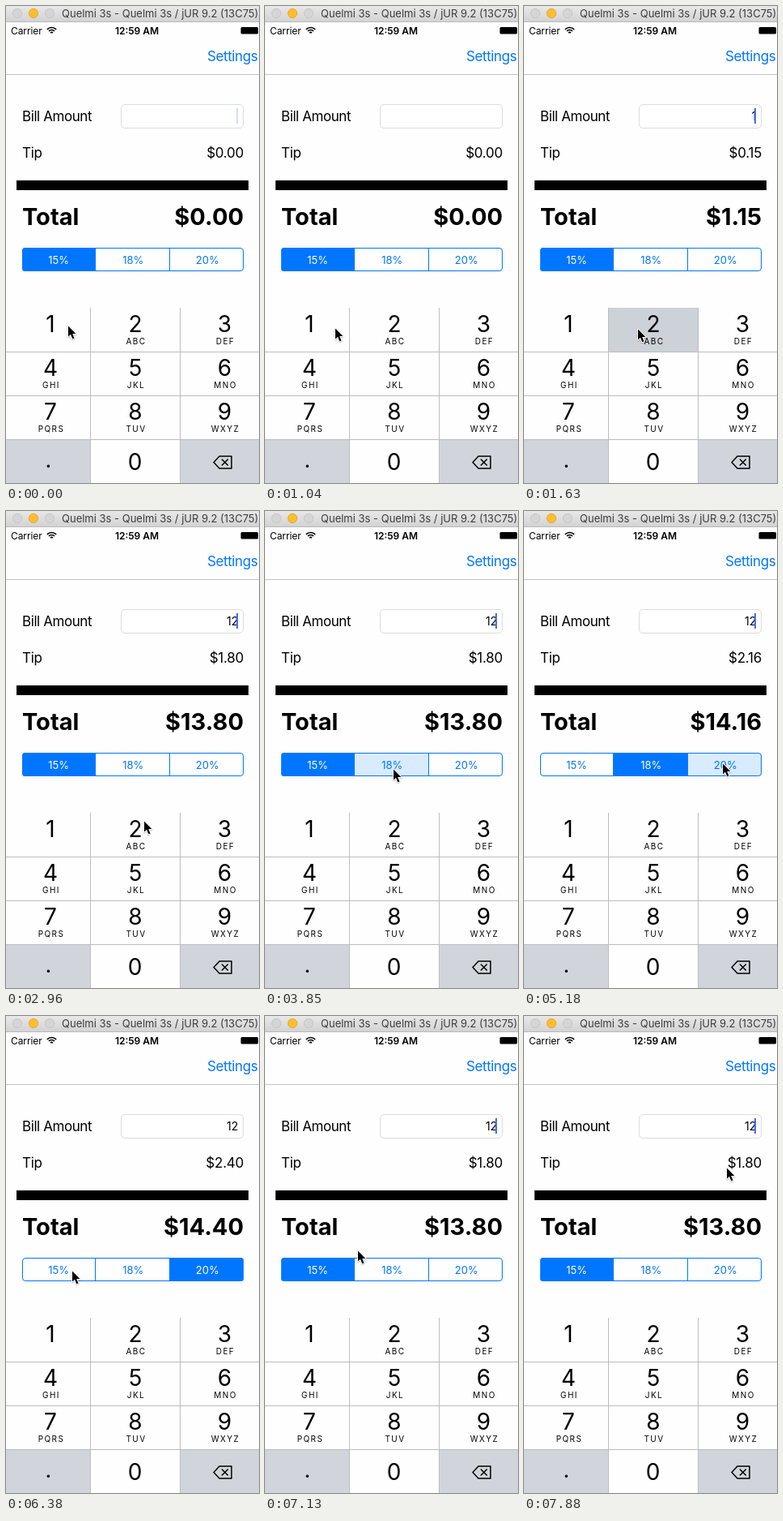
An HTML page with a canvas that plays this animation: 313x588 px, repeating every 8 s.

```html
<!DOCTYPE html>
<html lang="en">
<head>
<meta charset="utf-8">
<title>Tip calculator</title>
<style>
html, body { margin: 0; width: 100%; height: 100%; overflow: hidden; background: #fefefe; }
canvas { display: block; width: 313px; height: 588px; }
</style>
</head>
<body>
<canvas id="stage"></canvas>
<script>
const W = 313, H = 588, LOOP = 8000, TICK = 148.7;
const BLUE = '#0076ff', PAPER = '#fefefe', KEY_GREY = '#d1d5db', LINE = '#bcbdc0';
const RATES = [15, 18, 20];
const canvas = document.getElementById('stage');
const ctx = canvas.getContext('2d');
const dpr = window.devicePixelRatio || 1;
canvas.width = W * dpr;
canvas.height = H * dpr;

const taps = [
  { down: 1330, up: 1480, key: 1 },
  { down: 1630, up: 1770, key: 2 },
  { down: 3850, up: 4000, segment: 1 },
  { down: 5180, up: 5330, segment: 2 },
  { down: 6680, up: 6830, segment: 0 }
];

const home = { x: 76, y: 393 };
const moves = [
  { from: 0, to: 440, x: 86, y: 396 },
  { from: 1190, to: 1630, x: 140, y: 397 },
  { from: 1770, to: 2060, x: 158, y: 419 },
  { from: 2210, to: 2960, x: 170, y: 381 },
  { from: 2960, to: 3550, x: 158, y: 317 },
  { from: 4140, to: 4660, x: 200, y: 325 },
  { from: 4660, to: 5180, x: 245, y: 310 },
  { from: 5930, to: 6380, x: 81, y: 313 },
  { from: 6830, to: 7580, x: 170, y: 246 },
  { from: 7580, to: 7880, x: 250, y: 186 }
];

const smooth = k => k * k * (3 - 2 * k);
const clamp = k => Math.min(1, Math.max(0, k));

function pointerAt(t) {
  let { x, y } = home;
  for (const m of moves) {
    const k = smooth(clamp((t - m.from) / (m.to - m.from)));
    x += (m.x - x) * k;
    y += (m.y - y) * k;
  }
  return [Math.round(x), Math.round(y)];
}

// Blinks once a second; typing keeps it lit and restarts the cycle.
function caretAlpha(t) {
  if (t >= 1330 && t < 2000) return 1;
  const phase = (t < 1330 ? t + 340 : t) % 1000;
  return phase >= 750 ? 1 : clamp((380 - phase) / 180);
}

function stateAt(t) {
  const state = { bill: 0, selected: 0 };
  for (const { down, up, key, segment } of taps) {
    if (t >= up) {
      if (key) state.bill = state.bill * 10 + key;
      else state.selected = segment;
    } else if (t >= down) {
      state.key = key;
      state.touched = segment;
    }
  }
  return state;
}

function rect(x, y, w, h, color) {
  ctx.fillStyle = color;
  ctx.fillRect(x, y, w, h);
}

function text(str, x, y, size, { color = '#000', weight = 400, align = 'left', track = 0 } = {}) {
  ctx.font = `${weight} ${size}px Inter, "Liberation Sans", sans-serif`;
  ctx.letterSpacing = track + 'px';
  ctx.textAlign = align;
  ctx.fillStyle = color;
  ctx.fillText(str, x, y);
}

function stroke(color, width) {
  ctx.strokeStyle = color;
  ctx.lineWidth = width;
  ctx.stroke();
}

function fill(color) {
  ctx.fillStyle = color;
  ctx.fill();
}

function polygon(points) {
  ctx.beginPath();
  points.forEach(([x, y]) => ctx.lineTo(x, y));
  ctx.closePath();
}

function roundBox(x, y, w, h, r) {
  ctx.beginPath();
  ctx.roundRect(x, y, w, h, r);
}

function titleBar() {
  const shade = ctx.createLinearGradient(0, 0, 0, 20);
  shade.addColorStop(0, '#e8e8e8');
  shade.addColorStop(1, '#d2d2d2');
  rect(0, 0, W, 20, shade);
  rect(0, 19, W, 1, '#b9b9b9');
  for (let i = 0; i < 3; i++) {
    ctx.beginPath();
    ctx.arc(14 + 20 * i, 9, 5.7, 0, Math.PI * 2);
    fill(i === 1 ? '#fdbd2f' : '#d5d5d5');
    stroke(i === 1 ? '#e0a32a' : '#c2c2c2', 0.8);
  }
  text('Quelmi 3s - Quelmi 3s / jUR 9.2 (13C75)', 69, 14, 13, { color: '#3c3c3c' });
}

function statusBar() {
  text('Carrier', 6, 34.5, 12, { track: -0.1 });
  for (const r of [2, 5, 8]) {
    ctx.beginPath();
    ctx.arc(56.5, 34.5, r, -Math.PI * 0.75, -Math.PI * 0.25);
    stroke('#000', 1.7);
  }
  text('12:59 AM', 162, 34.5, 12, { weight: 600, align: 'center' });
  roundBox(290.5, 26, 21.5, 8.5, 1.5);
  fill('#000');
}

function segments(selected, touched) {
  const edges = [20, 110.5, 202.5, 294];
  ctx.save();
  roundBox(20, 298, 274, 29, 3.5);
  ctx.clip();
  RATES.forEach((rate, i) => {
    const color = i === selected ? BLUE : i === touched ? '#d8ebff' : PAPER;
    rect(edges[i], 298, edges[i + 1] - edges[i], 29, color);
    if (i) rect(edges[i] - 0.5, 298, 1, 29, BLUE);
    text(rate + '%', 65.2 + 92 * i, 317.5, 13, {
      color: i === selected ? '#fff' : BLUE, align: 'center'
    });
  });
  ctx.restore();
  roundBox(20.5, 298.5, 273, 28, 3.5);
  stroke(BLUE, 1);
}

function form({ bill, selected, touched }, caret) {
  text('Settings', 249, 68, 17, { color: BLUE, track: -0.4 });
  rect(0, 84, W, 1, '#c4c4c4');

  text('Bill Amount', 20, 141.5, 17, { track: -0.42 });
  roundBox(142.5, 121.5, 151, 29, 4.5);
  fill('#fff');
  stroke('#dcdcdc', 1);
  if (bill) text(String(bill), 287.3, 140.5, 14, { align: 'right' });
  ctx.globalAlpha = caret;
  rect(285, 126, 2, 19, '#426bf2');
  ctx.globalAlpha = 1;

  const tip = bill * RATES[selected] / 100;
  const money = n => '$' + n.toFixed(2);
  text('Tip', 20, 186.5, 17, { track: -0.3 });
  text(money(tip), 294, 186.5, 17, { align: 'right', track: -0.25 });
  rect(13, 215, 287, 12, '#000');
  text('Total', 20, 270, 29, { weight: 700 });
  text(money(bill + tip), 294, 270, 29, { weight: 700, align: 'right' });
  segments(selected, touched);
}

function deleteIcon() {
  ctx.save();
  ctx.lineJoin = ctx.lineCap = 'round';
  polygon([[257, 562.5], [264, 555], [279, 555], [279, 570], [264, 570]]);
  stroke('#000', 1.5);
  ctx.beginPath();
  for (const s of [-1, 1]) {
    ctx.moveTo(267.3, 562.5 - 3.5 * s);
    ctx.lineTo(274.3, 562.5 + 3.5 * s);
  }
  stroke('#000', 1.5);
  ctx.restore();
}

function keypad(pressed) {
  const letters = ['', 'ABC', 'DEF', 'GHI', 'JKL', 'MNO', 'PQRS', 'TUV', 'WXYZ'];
  const left = [0, 105, 216], center = [55, 160, 270.5];
  rect(0, 534, 104, 54, KEY_GREY);
  rect(216, 534, 97, 54, KEY_GREY);
  letters.forEach((label, i) => {
    const col = i % 3, top = 372 + 54 * Math.floor(i / 3);
    if (pressed === i + 1) rect(left[col], top, 110, 54, '#cdd1d8');
    text(String(i + 1), center[col], top + 30, 28, { align: 'center' });
    text(label, center[col] + 1, top + 45, 10, { align: 'center', track: 1.4 });
  });
  for (const y of [426, 480, 534]) rect(0, y, W, 1, LINE);
  for (const x of [104, 215]) rect(x, 372, 1, 216, LINE);
  text('0', 159.5, 571.5, 28, { align: 'center' });
  text('.', 52.5, 569, 27, { align: 'center' });
  deleteIcon();
}

function pointer(x, y) {
  ctx.save();
  ctx.translate(x, y);
  polygon([[1, 1.6], [1, 14.6], [4, 11.8], [6.3, 17.3], [8.5, 16.4], [6.2, 11], [10.4, 11]]);
  ctx.shadowColor = 'rgba(0,0,0,0.3)';
  ctx.shadowBlur = 1.5 * dpr;
  ctx.shadowOffsetY = 0.7 * dpr;
  ctx.lineJoin = 'round';
  stroke('#fff', 2);
  ctx.shadowColor = 'transparent';
  fill('#000');
  ctx.restore();
}

function draw(time) {
  // Motion advances in coarse ticks, like a low frame rate screen capture.
  const tick = Math.floor((time + 25) / TICK) * TICK;
  const state = stateAt(time);
  ctx.setTransform(dpr, 0, 0, dpr, 0, 0);
  rect(0, 0, W, H, PAPER);
  titleBar();
  statusBar();
  form(state, caretAlpha(tick));
  keypad(state.key);
  pointer(...pointerAt(tick));
}

const start = performance.now();
function loop() {
  draw((performance.now() - start) % LOOP);
  requestAnimationFrame(loop);
}
loop();
</script>
</body>
</html>
```
